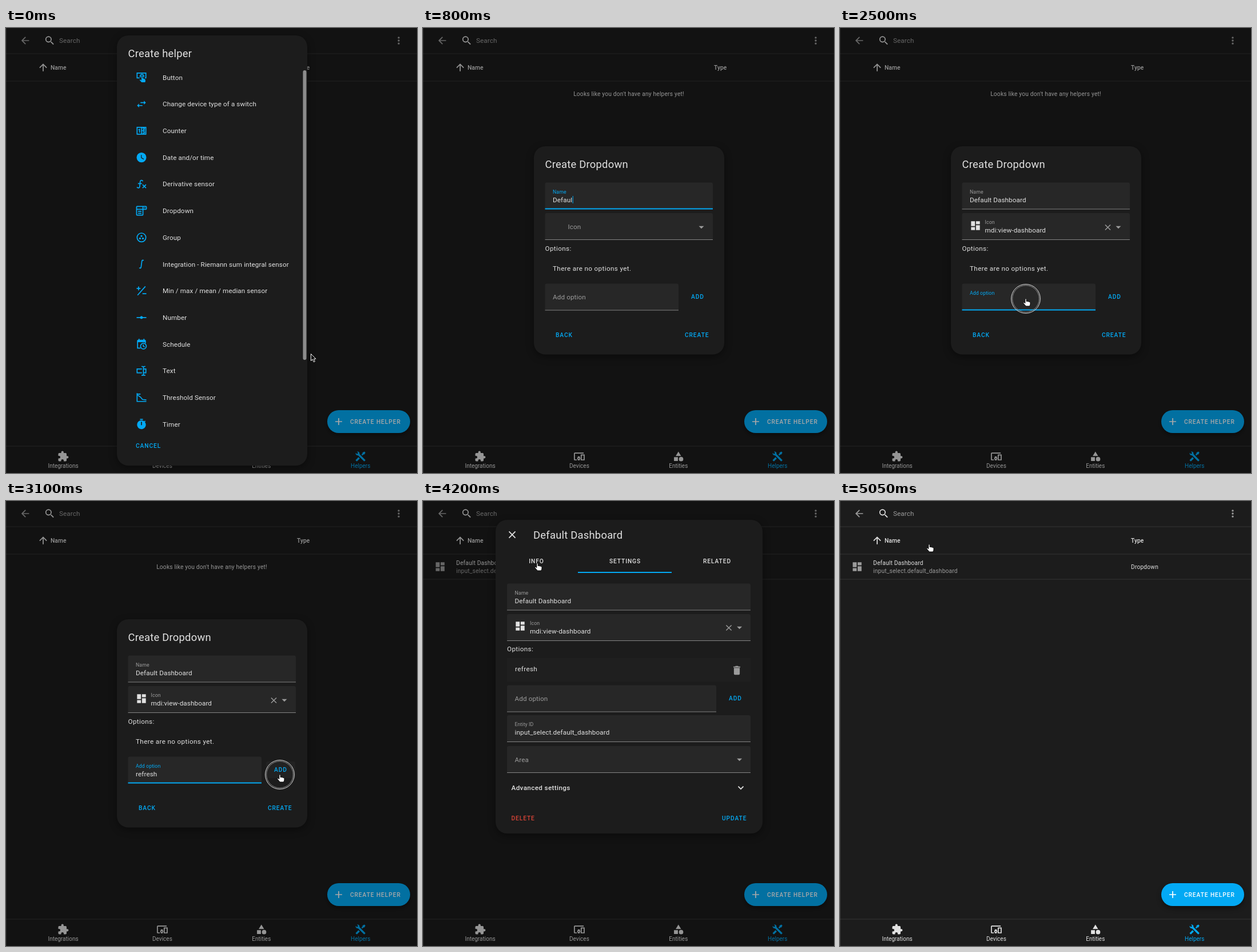
These frames come from a looping animation (719 by 779 pixels, 5200 ms). An HTML page with a canvas:

```html
<!DOCTYPE html>
<html lang="en">
<head>
<meta charset="utf-8">
<title>Create a dropdown helper</title>
<style>
html, body { margin: 0; height: 100%; overflow: hidden; background: #1c1c1c }
canvas { display: block }
</style>
</head>
<body>
<canvas width="719" height="779"></canvas>
<script>
const ctx = document.querySelector('canvas').getContext('2d');
const TEXT = '#e1e1e1', DIM = '#9b9b9b', BLUE = '#03a9f4', CARD = '#1c1c1c', RULE = 'rgba(225,225,225,.12)';

// size, letter spacing in em, weight
const styles = {
  title: [18.4, .0125, 400], body: [11.69, .009, 400], wide: [11.69, .031, 400], strong: [11.69, .031, 500],
  small: [8.77, .009, 400], button: [10.23, .089, 500], cell: [10.23, .018, 400], head: [10.23, .01, 500],
  nav: [10, 0, 400], option: [10.2, 0, 400], section: [13.4, .0125, 500], meta: [10.1, .03, 400], axis: [10.23, .05, 500]
};

// 24-unit icons; parts split by "|", a leading "~" marks a stroked part
const tiles = 'M3 3H11V13H3ZM13 3H21V9H13ZM3 15H11V21H3Z';
const tileLines = '~M4 4H10V12H4ZM14 4H20V8H14ZM4 16H10V20H4Z';
const pencil = '|M13 19.2L19 13.2L21 15.2L15 21.2H13ZM19.7 12.5L20.7 11.5L22.7 13.5L21.7 14.5Z';
const icons = {
  back: 'M20 11V13H8L13.5 18.5L12.08 19.92L4.16 12L12.08 4.08L13.5 5.5L8 11Z',
  up: 'M13 20H11V8L5.5 13.5L4.08 12.08L12 4.16L19.92 12.08L18.5 13.5L13 8Z',
  search: '~M15 9.5A5.5 5.5 0 1 1 4 9.5A5.5 5.5 0 1 1 15 9.5|M14 14.7L14.7 14H15.5L20.5 19L19 20.5L14 15.5Z',
  dots: 'M14 6A2 2 0 1 1 10 6A2 2 0 1 1 14 6M14 12A2 2 0 1 1 10 12A2 2 0 1 1 14 12M14 18A2 2 0 1 1 10 18A2 2 0 1 1 14 18',
  puzzle: 'M20.5 11H19V7Q19 5 17 5H13V3.5A2.5 2.5 0 0 0 8 3.5V5H4A2 2 0 0 0 2 7V10.8H3.5A2.7 2.7 0 0 1 3.5 16.2H2V20A2 2 0 0 0 4 22H7.8V20.5A2.7 2.7 0 0 1 13.2 20.5V22H17A2 2 0 0 0 19 20V16H20.5A2.5 2.5 0 0 0 20.5 11Z',
  devices: '~M21 5H3Q2 5 2 6V18Q2 19 3 19H7M16 9H22V19H16ZM13.2 16A2.2 2.2 0 1 1 8.8 16A2.2 2.2 0 1 1 13.2 16|M9 12H13V14H9ZM9 18H13V20H9Z',
  shape: 'M11 13.5V21.5H3V13.5ZM12 2L17.5 11H6.5ZM22 17.5A4.5 4.5 0 1 1 13 17.5A4.5 4.5 0 1 1 22 17.5',
  tools: 'M21.7 20.3L20.3 21.7A1 1 0 0 1 18.9 21.7L7 9.85A3.8 3.8 0 0 1 6 10A4 4 0 0 1 2.2 4.7L4.8 7.2L7.2 4.8L4.7 2.2A4 4 0 0 1 10 6A3.8 3.8 0 0 1 9.85 7L21.7 18.9A1 1 0 0 1 21.7 20.3M2.3 18.9A1 1 0 0 0 2.3 20.3L3.7 21.7A1 1 0 0 0 5.1 21.7L10.6 16.25L7.8 13.4ZM20 2L16 4V6L13.8 8.2L15.8 10.2L18 8H20L22 4Z',
  plus: 'M19 13H13V19H11V13H5V11H11V5H13V11H19Z',
  close: '~M5.7 5.7L18.3 18.3M18.3 5.7L5.7 18.3',
  chevron: '~M6.7 9.3L12 14.6L17.3 9.3',
  trash: 'M19 4H15.5L14.5 3H9.5L8.5 4H5V6H19ZM6 19A2 2 0 0 0 8 21H16A2 2 0 0 0 18 19V7H6Z',
  tap: '~M8 13H3V3H21V13H19M10.5 11.8A3.5 3.5 0 1 1 15.5 11.8|M8 17.4L9.5 16.3L12 18V9A1 1 0 0 1 14 9V13.5L15.2 13.6L19.2 15.8Q20 16.3 20 17.1V20.5Q20 22 18.5 22H13Q12.4 22 12 21.6Z',
  swap: 'M21 9L17 5V8H10V10H17V13ZM7 11L3 15L7 19V16H14V14H7Z',
  counter: '~M3 5H21V19H3ZM12 5V19M5.8 10L8 9V16M14.5 8C14.5 6 18.5 6 18.5 8L14.5 11.5H19M14.5 15C15 13.5 19 13.5 18.5 15.5C18 18 14.5 18 14.5 16.5',
  clock: 'M22 12A10 10 0 1 1 2 12A10 10 0 1 1 22 12M16.2 16.2L11 13V7H12.5V12.2L17 14.9Z',
  fx: '~M15 6C13 3 9.6 4 9.3 7L8.4 17C8 20.4 4.5 20.6 2.7 18.1M4.8 11H12.8M14.2 13L21.3 20M21.3 13L14.2 20',
  dropdown: 'M17 5H20L18.5 7Z|~M3 3H21Q22 3 22 4V8Q22 9 21 9H2V4Q2 3 3 3ZM15 3V20Q15 21 14 21H3Q2 21 2 20V9M5 13H12M5 17H12',
  group: '~M21 12A9 9 0 1 1 3 12A9 9 0 1 1 21 12|M14 9A2 2 0 1 1 10 9A2 2 0 1 1 14 9M11 14A2 2 0 1 1 7 14A2 2 0 1 1 11 14M17 14A2 2 0 1 1 13 14A2 2 0 1 1 17 14',
  integral: '~M16.5 4.5C13.5 2.5 12.8 5 12.5 8L11.5 16C11.2 19 10.5 21.5 7.5 19.5',
  minmax: '~M4 21L20 3M2 7H10M6 3V11M14 18H22',
  number: 'M2 11H9.2A3 3 0 0 1 14.8 11H22V13H14.8A3 3 0 0 1 9.2 13H2Z',
  schedule: 'M3 5Q3 3 5 3H6V1H8V3H16V1H18V3H19Q21 3 21 5V8H3Z|~M10 20H4V7M20 7V10M21.9 16A5.9 5.9 0 1 1 10.1 16A5.9 5.9 0 1 1 21.9 16M15.8 13V16.2L18.5 17.8',
  text: '~M12 3H14Q16 3 16 5V19Q16 21 14 21H12M20 3H18Q16 3 16 5M20 21H18Q16 21 16 19M13 8H3V16H13M17 8H21V16H17',
  threshold: '~M3 3V20H22M4 5H10M4 7L10 11L14 16L22 17',
  timer: 'M19 7.4L20.5 6L19 4.5L17.6 6A9 9 0 1 0 19 7.4M13 14H11V7H13ZM15 1H9V3H15Z',
  view: tiles + 'M13 11H21V21H13Z',
  viewEdit: tiles + 'M13 11H18L13 16Z' + pencil,
  viewEditOutline: tileLines + 'M14 15V12H17' + pencil,
  viewOutline: tileLines + 'M14 12H20V20H14Z',
  variant: 'M2 5H8V19H2ZM9 5H15V10H9ZM16 5H22V14H16ZM9 11H15V19H9ZM16 15H22V19H16Z',
  monitor: '~M2 3H22V17H2ZM12 17V21M8 21H16|M5 6H12V11H5ZM13 6H19V8H13ZM13 9H19V14H13ZM5 12H12V14H5Z',
  tablet: '~M2 5H22V19H2Z|M3 5H5V19H3ZM19 5H21V19H19ZM7 8H12V12H7ZM13 8H17V10H13ZM13 11H17V16H13ZM7 13H12V16H7Z'
};

const helpers = [
  ['tap', 'Button'], ['swap', 'Change device type of a switch'], ['counter', 'Counter'],
  ['clock', 'Date and/or time'], ['fx', 'Derivative sensor'], ['dropdown', 'Dropdown'], ['group', 'Group'],
  ['integral', 'Integration - Riemann sum integral sensor'], ['minmax', 'Min / max / mean / median sensor'],
  ['number', 'Number'], ['schedule', 'Schedule'], ['text', 'Text'], ['threshold', 'Threshold Sensor'], ['timer', 'Timer']
];
const iconOptions = [
  ['monitor', 'monitor'], ['tablet', 'tablet'], ['view', 'view'], ['viewEdit', 'view', '-edit'],
  ['viewEditOutline', 'view', '-edit-outline'], ['viewOutline', 'view', '-outline'], ['variant', 'view', '-variant']
];
const log = [['living-room', '5:31:38'], ['lovelace', '5:12:16'], ['living-room', '5:04:39'], ['lovelace', '5:02:45']];

// time, x, y, kind: a arrow, h hand, H hand with click ring, - hidden
const pointer = [
  [0, 533, 570, 'a'], [100, 440, 440, 'h'], [200, 310, 324, 'h'], [300, 306, 322, 'H'], [400, 306, 322, 'h'],
  [600, 0, 0, '-'], [1300, 320, 340, 'h'], [1400, 320, 345, 'H'], [1500, 0, 0, '-'], [1900, 330, 470.5, 'h'],
  [2000, 320, 485, 'h'], [2200, 310, 492, 'H'], [2300, 310, 492, 'h'], [2400, 320, 480, 'h'], [2500, 325, 474, 'H'],
  [2600, 0, 0, '-'], [3100, 479, 479, 'H'], [3200, 479, 483, 'h'], [3300, 479, 520, 'h'], [3400, 479, 540, 'H'],
  [3500, 479, 540, 'h'], [3600, 400, 380, 'a'], [3700, 290, 190, 'a'], [3800, 243, 117, 'a'], [4100, 218, 112, 'h'],
  [4200, 200, 109, 'h'], [4300, 200, 109, 'H'], [4400, 238, 160, 'h'], [4500, 245, 167, 'h'], [4600, 232, 215, 'H'],
  [4700, 225, 190, 'h'], [4800, 185, 115, 'h'], [4900, 156, 66, 'H'], [5050, 156, 76, 'h']
];

function box(x, y, w, h, color, r = 0) {
  ctx.fillStyle = color;
  ctx.beginPath();
  ctx.roundRect(x, y, w, h, r);
  ctx.fill();
}

function shadowBox(x, y, w, h, color, r, blur = 14) {
  ctx.save();
  ctx.shadowColor = 'rgba(0,0,0,.4)';
  ctx.shadowBlur = blur;
  ctx.shadowOffsetY = 4;
  box(x, y, w, h, color, r);
  ctx.restore();
}

// y is the middle of the capitals
function txt(style, s, x, y, color = TEXT, align = 'left') {
  const [size, spacing, weight] = styles[style];
  ctx.font = `${weight} ${size}px Roboto, sans-serif`;
  ctx.letterSpacing = size * spacing + 'px';
  ctx.textAlign = align;
  ctx.fillStyle = color;
  ctx.fillText(s, x, y + size * .355);
  return ctx.measureText(s).width;
}

function icon(name, x, y, color = TEXT, size = 20.5) {
  ctx.save();
  ctx.translate(x - size / 2, y - size / 2);
  ctx.scale(size / 24, size / 24);
  ctx.fillStyle = ctx.strokeStyle = color;
  ctx.lineWidth = 2;
  for (const part of icons[name].split('|')) {
    if (part[0] === '~') ctx.stroke(new Path2D(part.slice(1)));
    else ctx.fill(new Path2D(part), 'evenodd');
  }
  ctx.restore();
}

function triangle(x, y, up, color = DIM) {
  const h = up ? -2.3 : 2.3;
  ctx.fillStyle = color;
  ctx.fill(new Path2D(`M${x - 4.5} ${y - h}H${x + 4.5}L${x} ${y + h}Z`));
}

function field(x, y, w, label, value, focus, labelX = 13.5, valueX = labelX, floated = focus || value) {
  box(x, y, w, 46, '#272727', [3, 3, 0, 0]);
  box(x, y + 46 - focus, w, 1 + focus, focus ? BLUE : '#848484');
  if (floated) txt('small', label, x + labelX, y + 16, focus ? BLUE : DIM);
  else txt('body', label, x + labelX, y + 23.5, DIM);
  return txt('body', value, x + valueX, y + (floated ? 30 : 27));
}

function page(hasRow) {
  box(0, 0, 719, 779, CARD);
  for (const y of [45, 93, 732]) box(0, y - .5, 719, 1, RULE);
  box(0, 0, 1, 779, RULE);
  icon('back', 33.5, 22, DIM);
  icon('search', 76.5, 22);
  txt('body', 'Search', 93, 22, DIM);
  icon('dots', 687, 22, DIM);
  icon('up', 65, 69);
  txt('head', 'Name', 78, 69);
  txt('head', 'Type', 509, 69);
  if (hasRow) {
    icon('view', 30, 115, DIM);
    txt('cell', 'Default Dashboard', 58, 108);
    txt('cell', 'input_select.default_dashboard', 58, 122.5, DIM);
    txt('cell', 'Dropdown', 509, 115);
    box(0, 136.5, 719, 1, RULE);
  } else txt('cell', "Looks like you don't have any helpers yet!", 360, 115, TEXT, 'center');
  shadowBox(562, 669, 145, 40, BLUE, 20, 8);
  icon('plus', 582, 689, '#fff');
  txt('button', 'CREATE HELPER', 602, 689, '#fff');
  [['puzzle', 'Integrations'], ['devices', 'Devices'], ['shape', 'Entities'], ['tools', 'Helpers']].forEach(([name, label], i) => {
    const x = 100 + i * 173.4, color = i === 3 ? BLUE : TEXT;
    icon(name, x, 750, color);
    txt('nav', label, x, 766, color, 'center');
  });
}

function helperList(t) {
  shadowBox(194, 13, 333, 753, CARD, 20);
  txt('title', 'Create helper', 213.5, 44);
  if (t > 100) box(194, 297, 325, 46.7, '#242424');
  helpers.forEach(([name, label], i) => {
    const y = 86.5 + i * 46.7;
    icon(name, 237, y, BLUE);
    txt('body', label, 274, y);
  });
  box(519.5, 74, 6, 507, '#8c8c8c', 3);
  txt('button', 'CANCEL', 227, 731, BLUE);
}

function dropdownForm(t, cursorY) {
  const name = 'Default Dashboard'.slice(0, Math.max(0, (t - 600) * .03));
  const picking = t >= 1400 && t < 2300, picked = t >= 2300, iconFocus = +(t >= 1400 && t < 2500);
  const added = t >= 3200, nameFocus = +(t >= 500 && t < 1400);
  shadowBox(194, 207, 333, 364.5, CARD, 20);
  txt('title', 'Create Dropdown', 213.5, 238);
  const w = field(213.5, 270.5, 293.5, 'Name', name, nameFocus);
  if (nameFocus) box(227.5 + w, 294, 1, 13, BLUE);
  const iconValue = picked ? 'mdi:view-dashboard' : 'dashb'.slice(0, Math.max(0, (t - 1400) / 80));
  field(213.5, 324, 293.5, 'Icon', iconValue, iconFocus, 40, picked ? 40 : 20.5);
  triangle(487, 349, picking, iconFocus ? BLUE : DIM);
  if (picked) {
    icon('view', 237, 346);
    icon('close', 468.5, 349, DIM, 17.5);
  }
  txt('wide', 'Options:', 213.5, 385.5);
  txt('wide', added ? 'refresh' : 'There are no options yet.', 227, 420.5);
  if (added) icon('trash', 487, 420.5, DIM);
  field(213.5, 447.5, 233.5, 'Add option', added ? '' : 'refresh'.slice(0, Math.max(0, (t - 2500) * .015)), +(t >= 2500));
  if (t >= 3100 && t < 3300) box(455, 456, 51, 29, '#222', 3);
  txt('button', 'ADD', 469, 470.5, BLUE);
  txt('button', 'BACK', 232, 537, BLUE);
  txt('button', 'CREATE', 458, 537, BLUE);
  if (!picking || t < 1500) return;
  shadowBox(213.5, 371, 293.5, 351, CARD, [0, 0, 3, 3]);
  const hover = t >= 1900 ? Math.floor((cursorY - 377.3) / 46.7) : -1;
  iconOptions.forEach(([shape, kind, suffix = ''], i) => {
    const y = 400.5 + i * 46.7;
    if (i === hover) box(213.5, y - 23.3, 293.5, 46.7, '#222');
    icon(shape, 243, y, '#a8a8a8');
    txt('option', `mdi:${kind}-dashboard${suffix}`, 274, y);
  });
}

function detailShell(active, bottom) {
  shadowBox(127, 33, 467, bottom - 33, CARD, 20);
  icon('close', 156, 59, TEXT, 21);
  txt('title', 'Default Dashboard', 193, 59);
  [['INFO', 198.5, 127, 144], ['SETTINGS', 353.5, 271, 164], ['RELATED', 514.5, 435, 159]].forEach(([label, x, left, w]) => {
    const on = label === active;
    txt('button', label, x, 105.5, on && label === 'INFO' ? BLUE : TEXT, 'center');
    if (on) box(left, 124, w, 2, BLUE);
  });
}

function settings(t) {
  detailShell('SETTINGS', 582);
  field(147, 144.5, 426, 'Name', 'Default Dashboard', 0);
  field(147, 198, 426, 'Icon', 'mdi:view-dashboard', 0, 40, 40, t > 3900);
  icon('view', 170, 219);
  icon('close', 535, 222, DIM, 17.5);
  triangle(553.6, 222);
  txt('wide', 'Options:', 147, 258.5);
  box(147, 275, 426, 41, '#1f1f1f');
  txt('wide', 'refresh', 161, 294);
  icon('trash', 549, 296.5, DIM);
  field(147, 322.5, 366, 'Add option', '', 0);
  txt('button', 'ADD', 535, 345, BLUE);
  field(147, 375, 426, 'Entity ID', 'input_select.default_dashboard', 0);
  field(147, 429, 426, 'Area', '', 0);
  triangle(553.6, 453);
  txt('strong', 'Advanced settings', 154.5, 502);
  icon('chevron', 556, 502);
  txt('button', 'DELETE', 154.5, 555, '#db4437');
  txt('button', 'UPDATE', 523, 555, BLUE);
}

function showMore(y) {
  const w = txt('wide', 'Show more', 512, y, BLUE);
  box(512, y + 5.5, w, 1, BLUE);
}

function info(t) {
  const focus = +(t >= 4500 && t < 4900), open = focus && t < 4700;
  detailShell('INFO', 571.5);
  icon('view', 161.5, 172.5, '#44739e');
  field(177.5, 147, 396.5, 'Default Dashboard', 'refresh', focus, 9.5);
  triangle(554, 170.5, open, focus ? BLUE : DIM);
  txt('section', 'History', 147, 218);
  showMore(218);

  const colors = { b: '#44739e', p: '#984ea3', o: '#ff7f00', c: '#00d2d5' };
  const starts = [151, 158, 160, 169, 178, 190, 195, 314, 323, 358, 360, 371, 400, 561];
  for (let i = 0; i < 5; i++) {
    box(169.5 + i * 91, 236, 1, 29, RULE);
    txt('axis', `${3 + i}:00 PM`, 170 + i * 91, 278, '#c4c4c4', 'center');
  }
  starts.forEach((x, i) => box(x, 242, (starts[i + 1] || 573.5) - x, 17, colors['bpbpobobpobobc'[i]]));
  txt('axis', 'lovelace', 198, 250, '#fff');
  txt('axis', 'living-room', 404, 250, '#fff');

  txt('section', 'Logbook', 147, 312);
  showMore(312);
  ctx.save();
  ctx.beginPath();
  ctx.rect(127, 325, 467, 214.5);
  ctx.clip();
  txt('strong', 'November 16, 2022', 160, 345, '#fff');
  log.forEach(([view, time], i) => {
    const y = 376.5 + i * 48.7;
    box(147, y - 16, 423, 1, 'rgba(225,225,225,.2)');
    txt('wide', `Changed to ${view} triggered by service input_select.select_option`, 160, y);
    txt('meta', `${time} PM - 2 hours ago - tarvil`, 160, y + 17.3, DIM);
  });
  ctx.restore();
  box(569.5, 331, 4.5, 40.5, '#c0c0c0', 2);
  if (open) {
    shadowBox(177.5, 200, 93, 47, CARD, 3, 8);
    box(177.5, 200, 93, 41, '#1f3a48', [3, 3, 0, 0]);
    txt('body', 'refresh', 190.5, 220, BLUE);
  }
}

function pointerAt(t) {
  const i = pointer.findLastIndex(key => key[0] <= t);
  const [t0, x0, y0, kind] = pointer[i], [t1, x1, y1, nextKind] = pointer[i + 1] || pointer[i];
  const p = t1 > t0 && nextKind !== '-' ? (t - t0) / (t1 - t0) : 0;
  return { x: x0 + (x1 - x0) * p, y: y0 + (y1 - y0) * p, kind: kind === 'H' && t > t0 ? 'h' : kind };
}

function drawPointer({ x, y, kind }) {
  if (kind === '-') return;
  ctx.save();
  ctx.translate(x, y);
  ctx.lineWidth = 1;
  if (kind === 'H') {
    [[25.4, '#dcdcdc'], [23.4, '#8a8a8a']].forEach(([r, color]) => {
      ctx.strokeStyle = color;
      ctx.beginPath();
      ctx.arc(0, 0, r, 0, 7);
      ctx.stroke();
    });
  }
  const arrow = kind === 'a';
  const shape = new Path2D(arrow
    ? 'M.5.5V12.5L3.3 10L5.3 14.6L7.4 13.7L5.4 9.2H9Z'
    : 'M-1.2 .8C-1.2-.5 1.2-.5 1.2 .8V4.6C2 4 3.4 4.2 3.6 5C4.4 4.5 5.8 4.8 6 5.6C7 5.2 8 5.8 8 7V9C8 11 6.8 12 6.5 13H.2C-.5 11.8-3.5 9-4.2 7.6C-4.6 6.4-3 6-2 7L-1.2 7.8Z');
  ctx.fillStyle = arrow ? '#000' : '#fff';
  ctx.strokeStyle = arrow ? '#fff' : '#000';
  ctx.fill(shape);
  ctx.stroke(shape);
  ctx.restore();
}

function draw(t) {
  const cursor = pointerAt(t), age = t - 3866, detail = age > 0 && t < 5000;
  let scrim = t < 3500 ? 1 : t === 3500 ? .33 : 0;
  if (detail) scrim = Math.min(1, age / 150);
  page(t >= 3500);
  box(0, 0, 719, 779, `rgba(0,0,0,${.34 * scrim})`);
  if (t < 400) helperList(t);
  else if (t < 3500) dropdownForm(t, cursor.y);
  else if (detail) {
    const scale = 1 - .2 * (1 - Math.min(1, age / 150)) ** 3;
    ctx.save();
    ctx.globalAlpha = Math.min(1, age / 75);
    ctx.translate(360, 389);
    ctx.scale(scale, scale);
    ctx.translate(-360, -389);
    (t < 4300 ? settings : info)(t);
    ctx.restore();
  }
  drawPointer(cursor);
}

function tick() {
  const ms = performance.now() % 5200;
  draw(ms >= 5050 ? 5050 : Math.min(4900, Math.floor(ms / 100) * 100));
  requestAnimationFrame(tick);
}
tick();
</script>
</body>
</html>
```
